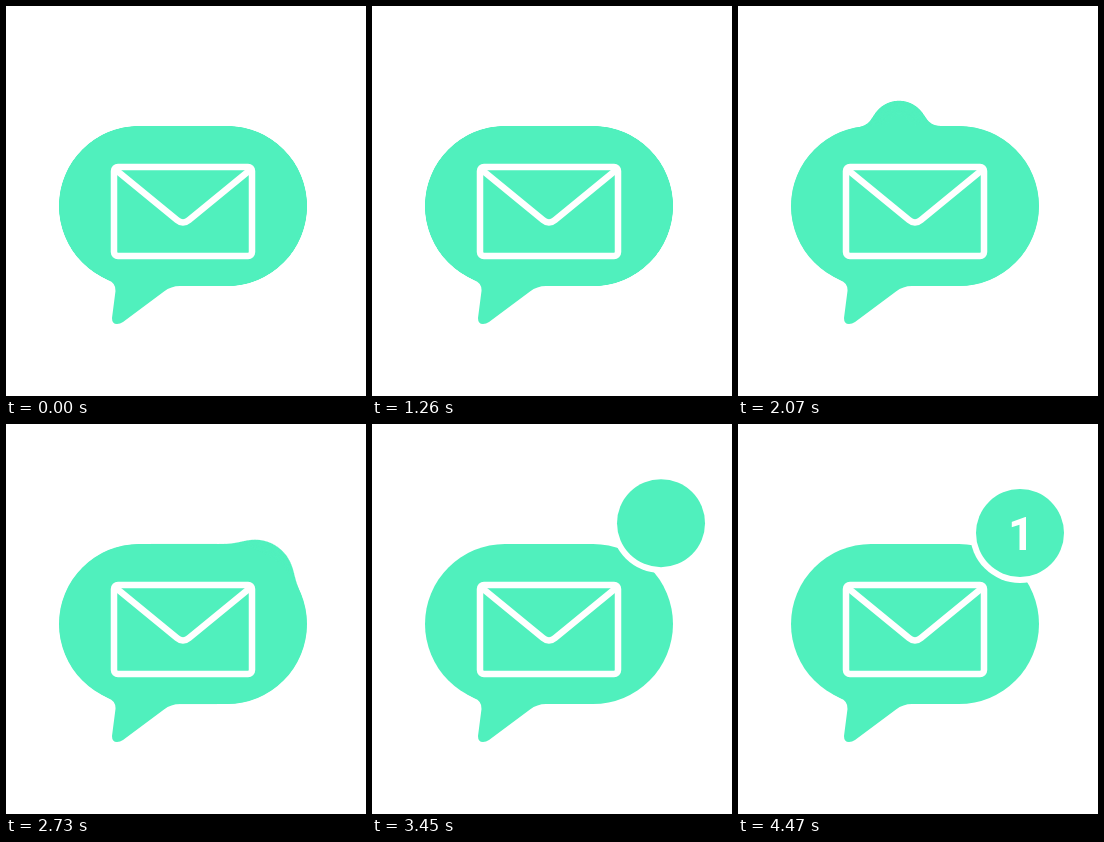
These frames come from a looping animation (360x390 px, 4.5 s). An HTML page:

```html
<!DOCTYPE html>
<html lang="en">
<head>
<meta charset="utf-8">
<title>New message</title>
<style>
  html, body { margin: 0; height: 100%; overflow: hidden; background: #fff; }
  svg { display: block; width: 100%; height: 100%; fill: #50f0bd; }
  .line { fill: none; stroke: #fff; stroke-width: 6.5; stroke-linejoin: round; stroke-linecap: round; }
  text { font: 700 46px Roboto, sans-serif; fill: #fff; }
</style>
</head>
<body>
<svg viewBox="0 0 360 390">
  <defs>
    <filter id="goo" filterUnits="userSpaceOnUse" x="0" y="0" width="360" height="390" color-interpolation-filters="sRGB">
      <feGaussianBlur id="blur"/>
      <feColorMatrix values="1 0 0 0 0  0 1 0 0 0  0 0 1 0 0  0 0 0 20 -9.5"/>
    </filter>
    <rect id="pill" x="53" y="120" width="248" height="160" rx="80"/>
  </defs>
  <g id="blob" filter="url(#goo)">
    <use href="#pill"/>
    <circle id="drop"/>
  </g>
  <use href="#pill"/>
  <path d="M95 260V270L102 274Q110 277 109.500 285L106 312Q106 318 111 318Q114 318 117 316L158 285.500Q165 280 174 280V260Z"/>
  <g class="line">
    <rect x="108" y="161" width="138" height="89" rx="4"/>
    <path d="M110 164L171 214Q177 219 183 214L244 164"/>
  </g>
  <g id="badge">
    <circle r="50" fill="#fff"/>
    <circle r="44"/>
    <text id="count" x="-12" y="17">1</text>
  </g>
</svg>
<script>
const LOOP = 4500;
const [blob, blur, drop, badge, count] =
  ['blob', 'blur', 'drop', 'badge', 'count'].map(id => document.getElementById(id));

// Each push drives the drop steadily outwards until its peak, then back.
const nudge = { from: [91, 189], to: [57, 133], peak: 945, rise: 450, fall: 420, radius: 20.4, swell: 0 };
const bulge = { from: [161, 152], to: [161, 89], peak: 1890, rise: 710, fall: 330, radius: 29.6, swell: 0 };
const launch = { from: [223.5, 190], to: [302, 81], peak: 3290, rise: 832, fall: 400, radius: 36.5, swell: 9.3 };
const REST = [282, 109];

const clamp = v => Math.min(1, Math.max(0, v));
const mix = (a, b, k) => a.map((v, i) => v + (b[i] - v) * k);
const easeInOut = k => (1 - Math.cos(Math.PI * k)) / 2;
const easeOut = k => 1 - (1 - k) ** 3;
const progress = (t, start, length) => clamp((t - start) / length);

function drawDrop(t) {
  const push = t < 1330 ? nudge : t < 2350 ? bulge : launch;
  const lag = t - push.peak;
  const reach = clamp(1 - (lag < 0 ? -lag / push.rise : lag / push.fall));
  const [x, y] = mix(push.from, push.to, reach);
  const r = push.radius + push.swell * reach;
  drop.setAttribute('cx', x);
  drop.setAttribute('cy', y);
  drop.setAttribute('r', r);
  blur.setAttribute('stdDeviation', (r - 5) / 4);
}

function drawBadge(t) {
  const [x, y] = mix(launch.to, REST, easeInOut(progress(t, launch.peak, 270)));
  badge.setAttribute('transform', `translate(${x} ${y})`);
  count.setAttribute('transform', `scale(${easeOut(progress(t, 3570, 270))})`);
}

function draw(now) {
  const t = now % LOOP, detached = t >= launch.peak;
  blob.style.display = detached ? 'none' : '';
  badge.style.display = detached ? '' : 'none';
  (detached ? drawBadge : drawDrop)(t);
  requestAnimationFrame(draw);
}
draw(performance.now());
</script>
</body>
</html>
```
